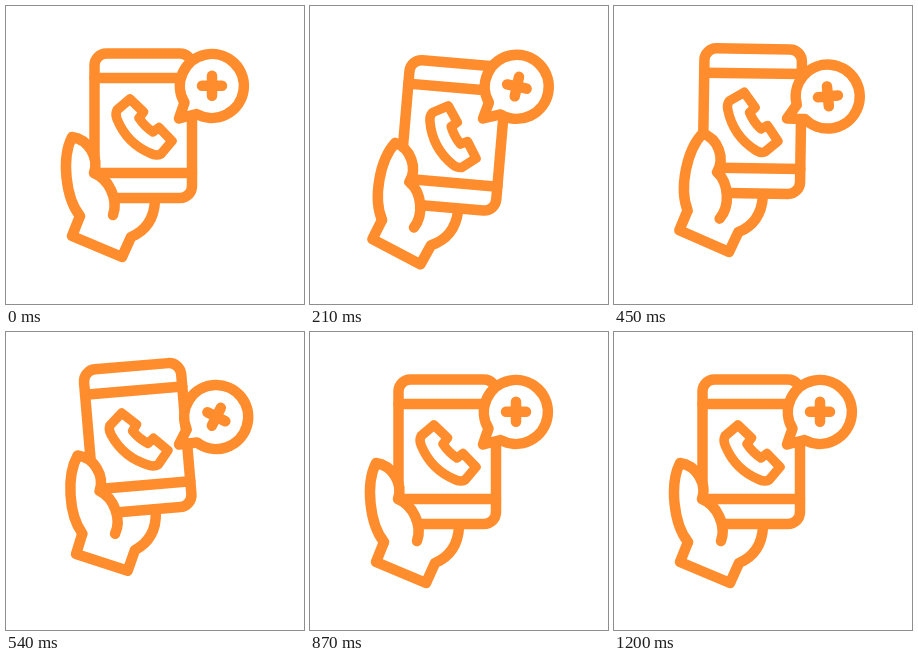
Recreate the animation shown at these times as an HTML page. Size 298x298 px, loop 1.26 s.

```html
<!DOCTYPE html>
<html lang="en">
<head>
<meta charset="utf-8">
<title>Mobile call</title>
<style>
  html, body { margin: 0; width: 100%; height: 100%; overflow: hidden; background: #fff; }
  svg { display: block; width: 100vw; height: 100vh; }
  .ink { fill: #fff; stroke: #ff8c2d; stroke-width: 10.5; stroke-linecap: round; stroke-linejoin: round; }
  .line { fill: none; }
</style>
</head>
<body>
<svg viewBox="0 0 298 298" class="ink">
  <g id="device">
    <path class="line" d="M149 195C148 214 139 225 125 231L116 251L66 230L74 210"/>
    <rect x="88.5" y="47.5" width="97.5" height="144.5" rx="12"/>
    <path class="line" d="M88.5 72H186M88.5 167H186"/>
    <path id="handset" stroke-width="9.5" d="M124 93L137.5 106L133 112Q138.5 120.5 147 126L153 121.5L166 135L155 148Q151 150 146 148Q121 138 111 113Q109 108 111 104Z"/>
    <path id="thumb"/>
  </g>
  <g id="bubble">
    <path d="M173 112.5L190.5 108A32 32 0 1 0 178.5 96.5Z"/>
    <path id="plus" class="line" d="M196 79.7H216M206 69.7V89.7"/>
  </g>
</svg>
<script>
const LOOP = 1260, STEP = 30;
const el = id => document.getElementById(id);
const device = el('device'), handset = el('handset'), thumb = el('thumb');
const bubble = el('bubble'), plus = el('plus');

// Smooth rise from 0 to 1 between times a and b.
function ease(t, a, b) {
  const u = Math.min(1, Math.max(0, (t - a) / (b - a)));
  return u * u * (3 - 2 * u);
}

// Rest, up to hi, down to lo, back to rest; hi is held from t1 to t2.
function wave(t, hi, lo, t0, t1, t2, t3, t4) {
  return hi * ease(t, t0, t1) + (lo - hi) * ease(t, t2, t3) - lo * ease(t, t3, t4);
}

// Ringing shake: a fast sine that swells and fades.
function ring(t) {
  const u = (t - 60) / 500;
  if (u < 0 || u > 1) return 0;
  return 15 * Math.sin(Math.PI * u) * Math.sin(Math.PI * (t - 150) / 120);
}

const mix = (a, b, u) => a.map((v, i) => v + (b[i] - v) * u);

// Curve from a to b that bulges sideways by k.
function bow(a, b, k) {
  const dx = b[0] - a[0], dy = b[1] - a[1], s = k * 4 / 3 / Math.hypot(dx, dy);
  const side = u => [a[0] + dx * u + dy * s, a[1] + dy * u - dx * s];
  return `C${side(0.25)} ${side(0.75)} ${b}`;
}

function drawThumb(grip) {
  const wrist = [74, 210];
  const tip = mix([66, 131], [91, 133], grip);
  const root = mix([88, 167], [105, 172], grip);
  const end = mix([107, 209], [106, 219], grip);
  thumb.setAttribute('d', `M${wrist}${bow(wrist, tip, 9.5)}${bow(tip, root, 9.5)}${bow(root, end, 8.5)}`);
}

function turn(node, angle, x, y, dy = 0) {
  node.setAttribute('transform', `translate(0 ${dy}) rotate(${angle} ${x} ${y})`);
}

function draw(t) {
  const sway = wave(t, 7.2, -7.8, 60, 300, 300, 635, 860);
  const lift = wave(t, 13, -14, 60, 290, 290, 555, 840);
  const tilt = wave(t, 16.5, -7, 180, 340, 440, 690, 870);
  turn(device, sway, 137, 185, lift);
  turn(handset, ring(t), 138, 120.5);
  drawThumb(wave(t, 1, -0.2, 60, 330, 390, 690, 860));
  turn(bubble, tilt, 173, 112.5);
  turn(plus, 180 * ease(t, 90, 840) - tilt, 206, 79.7);
}

const start = performance.now();
function tick() {
  const t = (performance.now() - start) % LOOP;
  draw(Math.floor(t / STEP) * STEP);
  requestAnimationFrame(tick);
}
draw(0);
requestAnimationFrame(tick);
</script>
</body>
</html>
```
